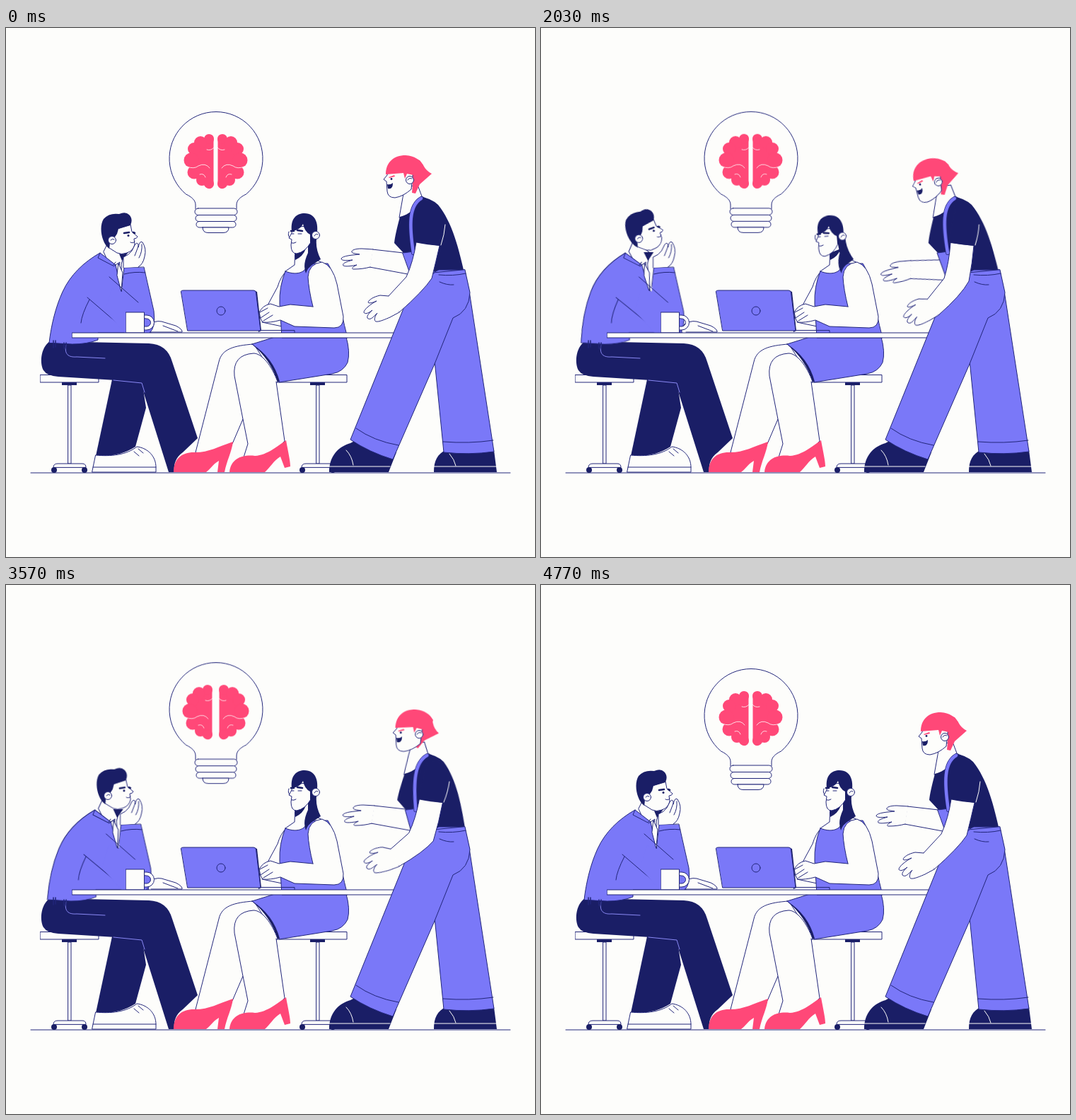
An HTML page without scripts that plays this animation: 748 px wide and 748 px high, repeating every 4810 ms.

```html
<!DOCTYPE html>
<html lang="en">
<head>
<meta charset="utf-8">
<title>Team meeting</title>
<style>
html, body { margin: 0; width: 100%; height: 100%; overflow: hidden; background: #fdfdfb; }
svg { display: block; width: 100%; height: 100%; }
svg * { stroke-linejoin: round; stroke-linecap: round; }
.w { fill: #fdfdfb; stroke: #22267a; }
.p { fill: #7a78f8; stroke: #22267a; }
.n { fill: #1a1e66; }
.r { fill: #ff4878; }
.l { fill: none; stroke: #22267a; }
.k { fill: none; stroke: #fdfdfb; }
.brow { fill: none; stroke: #1a1e66; stroke-width: 2.6; }
.move { animation: 4810ms ease-in-out infinite; }

.bulb { animation-name: bulb; }
@keyframes bulb {
  0%, 40%, 100% { transform: none; }
  54.7% { transform: translateY(-4.5px); }
  63.8% { transform: translateY(-8.5px); animation-timing-function: ease-out; }
  71% { transform: translateY(-9.5px); }
  82.5% { transform: translateY(-5.3px); }
  99% { transform: none; }
}
.lobe { animation-name: lobe; }
@keyframes lobe {
  0%, 40%, 99%, 100% { transform: none; }
  54.7% { transform: translateX(-1.2px); }
  68% { transform: translateX(-2.4px); }
  82.5% { transform: translateX(-1.6px); }
}

.man-torso { transform-origin: 60px 450px; animation-name: man-torso; }
@keyframes man-torso {
  0%, 21%, 99%, 100% { transform: translateX(0) skewX(0deg); }
  40%, 42.2% { transform: translateX(-4px) skewX(4.2deg); }
  54.7%, 65% { transform: translateX(-4px) skewX(3.6deg); }
  82.5% { transform: translateX(-1px) skewX(1deg); }
}
.man-arm { animation-name: man-arm; }
@keyframes man-arm {
  0%, 21%, 99%, 100% { transform: none; }
  40%, 65% { transform: translateX(-7.5px); }
  82.5% { transform: translateX(-2px); }
}
.man-head { transform-origin: 160px 290px; animation-name: man-head; }
@keyframes man-head {
  0%, 21%, 99%, 100% { transform: translate(0, 0) rotate(0deg); }
  40%, 42.2% { transform: translate(-14px, -4px) rotate(-12deg); }
  54.7%, 65% { transform: translate(-10px, -4px) rotate(-3deg); }
  82.5% { transform: translate(-3px, -1px) rotate(0deg); }
}

.sit-head { transform-origin: 421px 290px; animation-name: sit-head; }
@keyframes sit-head {
  0%, 2%, 53.5%, 100% { transform: translate(0, 0) rotate(0deg); }
  14%, 43.5% { transform: translate(-12px, 3px) rotate(-5deg); }
}
.sit-hair { transform-origin: 435px 342px; animation-name: sit-hair; }
@keyframes sit-hair {
  0%, 2%, 53.5%, 100% { transform: skewX(0deg); }
  14%, 43.5% { transform: skewX(11deg); }
}
.sit-arm { transform-origin: 445px 335px; animation-name: sit-arm; }
@keyframes sit-arm {
  0%, 4%, 41%, 100% { transform: skewX(0deg); }
  14%, 28% { transform: skewX(-8.5deg); }
}

.torso { transform-origin: 600px 370px; animation-name: torso; }
@keyframes torso {
  0%, 99.2%, 100% { transform: skewX(0deg); }
  15.2% { transform: skewX(1.6deg); }
  42.2% { transform: skewX(1deg); }
  54.7% { transform: skewX(-4.8deg); }
  63.8% { transform: skewX(-4deg); }
  82.5% { transform: skewX(-3.5deg); }
}
.head { transform-origin: 565px 210px; animation-name: head; }
@keyframes head {
  0%, 99.2%, 100% { transform: translate(0, 0) rotate(0deg); }
  15.2% { transform: translate(-16px, 7px) rotate(-15deg); }
  42.2% { transform: translate(-10px, 4px) rotate(-11deg); }
  54.7% { transform: translate(17px, -5px) rotate(4deg); }
  63.8% { transform: translate(14px, -4px) rotate(2deg); }
  82.5% { transform: translate(13px, -4px) rotate(2deg); }
}
.flick { transform-origin: 572px 195px; animation-name: flick; }
@keyframes flick {
  0%, 99.2%, 100% { transform: rotate(0deg); }
  15.2% { transform: rotate(-5deg); }
  42.2% { transform: rotate(4deg); }
  54.7%, 82.5% { transform: rotate(13deg); }
}
.far-arm { transform-origin: 517px 326px; animation-name: far-arm; }
@keyframes far-arm {
  0%, 99.2%, 100% { transform: translate(0, 0) rotate(0deg); }
  15.2% { transform: translate(10px, 20px) rotate(-10deg); }
  42.2% { transform: translate(6px, 16px) rotate(-8deg); }
  54.7% { transform: translate(6px, -2px) rotate(-1deg); }
  63.8% { transform: translate(7px, 5px) rotate(-5deg); }
  82.5% { transform: translate(-1px, -5px) rotate(3deg); }
}
.near-hand { transform-origin: 548px 391px; animation-name: near-hand; }
@keyframes near-hand {
  0%, 99.2%, 100% { transform: translate(0, 0) rotate(0deg); }
  15.2% { transform: translate(11px, 8px) rotate(-10deg); }
  42.2% { transform: translate(6px, 4px) rotate(-3deg); }
  54.7% { transform: translate(6px, -18px) rotate(20deg); }
  63.8% { transform: translate(6px, -12px) rotate(20deg); }
  82.5% { transform: translate(-2px, 0) rotate(0deg); }
}
.near-arm { animation-name: near-arm; }
@keyframes near-arm {
  0%, 99.2%, 100% { d: path("M580,303 Q576,330 566,352 L540,380 L556,402 Q590,372 602,354 Q608,330 613,308"); }
  15.2% { d: path("M577,304 Q577,335 576,358 L549,389 L569,408 Q600,380 609,362 Q611,335 611,308"); }
  42.2% { d: path("M579,304 Q577,332 570,354 L546,384 L562,406 Q594,378 605,358 Q610,332 612,308"); }
  54.7% { d: path("M586,303 Q584,330 577,350 L550,360 L558,386 Q594,383 608,376 Q616,345 619,308"); }
  63.8% { d: path("M585,303 Q582,330 575,352 L550,366 L558,392 Q592,386 606,374 Q613,342 618,308"); }
  82.5% { d: path("M584,303 Q578,330 566,350 L538,380 L554,402 Q590,372 603,354 Q612,330 617,308"); }
}
</style>
</head>
<body>
<svg viewBox="0 0 748 748">
  <defs>
    <g id="lobe">
      <g class="r">
        <path d="M293.500 155V222Q292 228 286 227L268 212 260 184 270 162 286 152Q292 149 293.500 155Z"/>
        <circle cx="287" cy="157" r="7"/><circle cx="275" cy="162" r="9"/>
        <circle cx="266" cy="171" r="9"/><circle cx="262" cy="187" r="10.5"/>
        <circle cx="266" cy="204" r="9.5"/><circle cx="277" cy="215" r="8"/>
        <circle cx="287" cy="220" r="7"/>
      </g>
      <path class="k" d="M256 196Q266 200 272 195Q282 190 288 198M284 172Q290 174 294 169M274 207Q280 205 282 211" stroke-width=".8"/>
    </g>
    <g id="seat">
      <path class="w" d="M88 505H92V616H88Z"/>
      <path class="n" d="M79 500H100V505H79Z"/>
      <path class="w" d="M67 621Q67 616 73 616H108Q113 616 113 621Z"/>
      <circle class="n" cx="68" cy="625" r="4"/><circle class="n" cx="111" cy="625" r="4"/>
    </g>
  </defs>

  <path class="l" d="M35 629H713"/>

  <g class="move bulb">
    <path class="w" d="M268 256V250C268 244 263 239 254.500 235A66 66 0 1 1 339.500 235C331 239 326 244 326 250V256"/>
    <rect class="w" x="267" y="255" width="60" height="9.500" rx="4.700"/>
    <rect class="w" x="268" y="264.500" width="58" height="9" rx="4.500"/>
    <rect class="w" x="269" y="273.500" width="56" height="8.500" rx="4.200"/>
    <path class="w" d="M278 282H315Q315 289.500 307 289.500H286Q278 289.500 278 282Z"/>
    <g class="move lobe"><use href="#lobe"/></g>
    <g transform="matrix(-1 0 0 1 593 0)"><g class="move lobe"><use href="#lobe"/></g></g>
  </g>

  <use href="#seat"/><use href="#seat" x="351"/>
  <path class="w" d="M48.500 490.500H131V501H48.500ZM380 490.500H482V501H380Z"/>

  <!-- seated man -->
  <g>
    <path class="n" d="M150 497L127 605Q160 607 183 592L198 537 192 498Z"/>
    <path class="w" d="M127 604C148 606 170 604 185 592C201 594 212 606 212 621V628H122Z"/>
    <path class="l" d="M123 621H212M181 599L188 605M187 595L194 601"/>
    <path class="n" d="M62 443C48 453 48 475 53 484Q58 492 74 493L155 498 190 501 230 628H238Q236 610 250 600L271 580 235 472Q228 447 202 446Z"/>
    <path d="M85 448C82 461 88 466 100 465L140 467M152 498L192 502 196 515" fill="none" stroke="#8a89f5"/>
    <g class="move man-torso">
      <path class="w" d="M138 316L146 300 168 318 163 334 164 372Z"/>
      <path class="n" d="M159 317L173 317Q168 324 164 329Z"/>
      <path class="p" d="M61 445C64 420 70 395 80 373C91 349 110 331 133 318L155 335 163 372 195 386 205 431 130 431 130 441Q115 447 94 447Z"/>
      <path class="l" d="M133 318L130 325 151 336 155 331M115 381L172 430M118 384Q107 405 106 417M152 337L161 331 158 348"/>
      <path class="w" d="M159 333L165 346 163 373 157 350Z"/>
    </g>
    <path class="l" d="M67 442V452M70 442V451M82 445V453M85 445V453" stroke-width="1.500"/>
    <path class="w" d="M200 421Q210 413 220 415L240 421Q250 426 249 430H205M222 421L243 429"/>
    <g class="move man-head">
      <path class="w" d="M148 287L176 278 178 288 186 295Q185 298 181 298L182 306Q180 315 171 318Q163 321 157 318L146 311Z"/>
      <path class="n" d="M146 312C135 304 131 281 138 270Q146 261 160 263Q169 259 174 264Q180 270 176 279L159 284 157 291 153 297 147 300Z"/>
      <circle class="w" cx="150" cy="300" r="5.500"/>
      <path class="l" d="M148 300Q150 297 153 299M176 303Q180 305 182 302"/>
      <path class="brow" d="M167 290L174 289M180 289L182 290"/>
      <circle class="n" cx="173" cy="293.500" r="1.500"/>
    </g>
    <g class="move man-arm">
      <path d="M167 339H195L209 400Q212 424 203 431H168L140 400 150 368 164 373Z" fill="#7a78f8"/>
      <path class="l" d="M146 352L187 388M164 366L167 339 195 338 209 400Q212 424 203 431M167 348Q182 344 197 346"/>
      <path class="w" d="M166 339V324Q174 321 178 315L182 307Q185 302 187 306L187 310Q189 300 193 303Q199 312 196 323Q194 334 187 338"/>
      <path class="l" d="M187 309L182 322M192 306Q193 316 188 325"/>
    </g>
    <path class="w" d="M194 406H199A10 10 0 0 1 199 427H194ZM195 411V422H199A5 5 0 0 0 199 411Z" fill-rule="evenodd"/>
    <path class="w" d="M169.500 402H195.500V431H169.500Z"/>
  </g>

  <!-- seated woman -->
  <g>
    <path class="w" d="M350 447C322 449 305 454 301 472L268 600 300 610 320 588 335 553 384 500Z"/>
    <path class="r" d="M237 628C237 608 250 599 268 600C287 600 300 592 321 585C319 600 312 612 309 628H299L301 612C292 617 289 624 283 628Z"/>
    <path class="w" d="M384 500C376 478 362 460 350 460Q320 462 323 492L335 553 342 588 336 607 370 608 394 584 382 500"/>
    <path class="r" d="M316 628C318 608 335 603 352 605C370 604 385 590 396 583C399 600 402 612 402 620L394 622 388 606C379 611 373 622 366 628Z"/>
    <path class="p" d="M348 447L380 437H481Q487 458 483 473Q477 486 461 489L386 501Q376 467 348 447Z"/>
    <path class="n" d="M348 447Q378 466 387 500H384Q374 469 348 447Z"/>
    <path class="w" d="M397 343Q388 352 384 366L371 390 362 416 400 424 398 370Z"/>
    <path class="w" d="M409 310L408 335 395 344Q402 352 428 350L452 334 432 325 428 300Z"/>
    <path class="p" d="M395 344C410 350 424 347 427 333L455 333C467 350 470 390 483 438H390L387 390Q386 366 395 344Z"/>
    <path class="n" d="M409 318L424 312Q420 323 409 328Z"/>
    <path class="n move sit-hair" d="M427 290L440 292Q436 310 445 327L436 333Q426 339 424 347Q419 335 427 318Z"/>
    <g class="move sit-head">
      <path class="w" d="M405 282L404 290 400 297 404 299 403 307Q403 319 411 319Q423 317 431 303L434 280Z"/>
      <path class="n" d="M404 287C402 268 412 262 422 262C438 262 444 277 438 300L430 304 430 292Q422 288 420 277Q416 286 404 287Z"/>
      <circle class="w" cx="438" cy="293" r="5.500"/>
      <path class="l" d="M436 294Q438 290 441 292M404 304Q407 305 410 303M404 291H407M413 291H418M400 288Q398 294 401 296"/>
      <path class="brow" d="M403 287H407M412 286L419 287"/>
    </g>
    <g class="move sit-arm">
      <path class="w" d="M434 394Q428 370 427 352Q428 333 447 331Q462 336 468 362L477 408Q478 424 464 424L408 422 388 413Q374 417 363 416L360 411 358 402Q363 392 374 390L386 394 402 391 434 394"/>
      <path class="l" d="M360 410L372 402M364 414L377 406M359 402L370 396"/>
    </g>
    <path class="l" d="M360 427.500H408V431"/>
    <path class="n" d="M350 371L355 373 361 428 357 430Z"/>
    <path class="p" d="M247.500 372Q248 371 251 371H350Q353 371 353.500 374L360 428H257Z"/>
    <circle class="l" cx="304" cy="400" r="6"/>
  </g>

  <path class="w" d="M93.500 431H560V438H93.500Z"/>

  <!-- standing woman -->
  <g class="move far-arm">
    <path class="w" d="M590 321L562 318 518 313 514 338 568 348 590 351"/>
    <path class="w" d="M519 313L503 312C494 312 488 314 489 317C490 319 496 319 500 320C490 321 476 322 474 326C474 329 480 329 490 328C480 331 475 333 477 336C480 338 492 336 496 335C489 338 488 341 492 341C500 341 508 340 515 338"/>
  </g>
  <path class="n" d="M457 628C457 605 470 592 487 587L500 580 552 600 541 628ZM605 628C605 612 610 602 622 597H690L694 628Z"/>
  <path class="k" d="M457 620H543M605 620H694M481 597Q489 605 491 618M627 602Q634 610 636 619"/>
  <g class="move torso">
    <path class="w" d="M561 240L556 268 574 276 602 246 588 238 582 222 564 225Z"/>
    <path class="n" d="M557 267C570 264 582 254 586 239Q600 240 611 250C631 275 640 310 650 355H575L562 318 549 304Q550 293 557 267Z"/>
    <path class="p" d="M561 318L577 316 607 345 600 370 566 380 572 350Z"/>
    <path d="M587 241C570 251 570 278 576 318" fill="none" stroke="#22267a" stroke-width="6"/>
    <path d="M587 241C570 251 570 278 576 318" fill="none" stroke="#7a78f8" stroke-width="4.500"/>
  </g>
  <path class="p" d="M606 470L619 600Q655 604 690 599L655 372 648 342H612L574 360Z"/>
  <path class="p" d="M606 346L572 372 487 582Q514 600 547 610L606 475 632 410Q655 401 656 374L649 342Z"/>
  <path class="l" d="M495 566Q520 584 555 590M618 585Q655 588 689 583M612 349Q632 351 650 347M613 359Q624 364 633 363"/>
  <path class="w move near-arm" d="M580,303 Q576,330 566,352 L540,380 L556,402 Q590,372 602,354 Q608,330 613,308"/>
  <g class="move near-hand">
    <path d="M538 382L552 372 566 392 554 401Z" fill="#fdfdfb"/>
    <path class="w" d="M541 379L529 378C520 380 513 384 512 388C513 390 520 388 524 386C516 390 506 398 506 402C507 405 512 404 518 399C512 404 509 409 512 411C516 413 520 408 525 403C521 408 520 414 523 415C527 416 536 412 543 409L556 402"/>
  </g>
  <g class="move torso">
    <path class="n" d="M588 250Q612 244 619 272L616 308Q596 307 578 303Z"/>
    <path class="k" d="M621 278Q620 292 615 307"/>
  </g>
  <g class="move head">
    <path class="r move flick" d="M568 184L585 187 590 194Q594 202 602 206L585 221 579 234 574 233 575 222 570 206Z"/>
    <path class="w" d="M540 203L539 208 534 214 538 217 539 231Q540 240 550 240Q562 238 573 228L576 200Z"/>
    <path class="r" d="M537 207C537 190 548 180 565 180C578 181 585 186 590 194L586 212 577 222 576 208 567 206 564 213 562 205Z"/>
    <circle class="w" cx="571" cy="215" r="5.500"/>
    <path class="l" d="M568 215Q570 211 574 213"/>
    <path class="r" d="M541 211L549 208 550 210 542 212Z"/>
    <circle class="n" cx="545" cy="213.500" r="1.400"/>
    <path class="n" d="M539 221Q544 222 547 219Q547 229 540 227Z"/>
  </g>
</svg>
</body>
</html>
```
